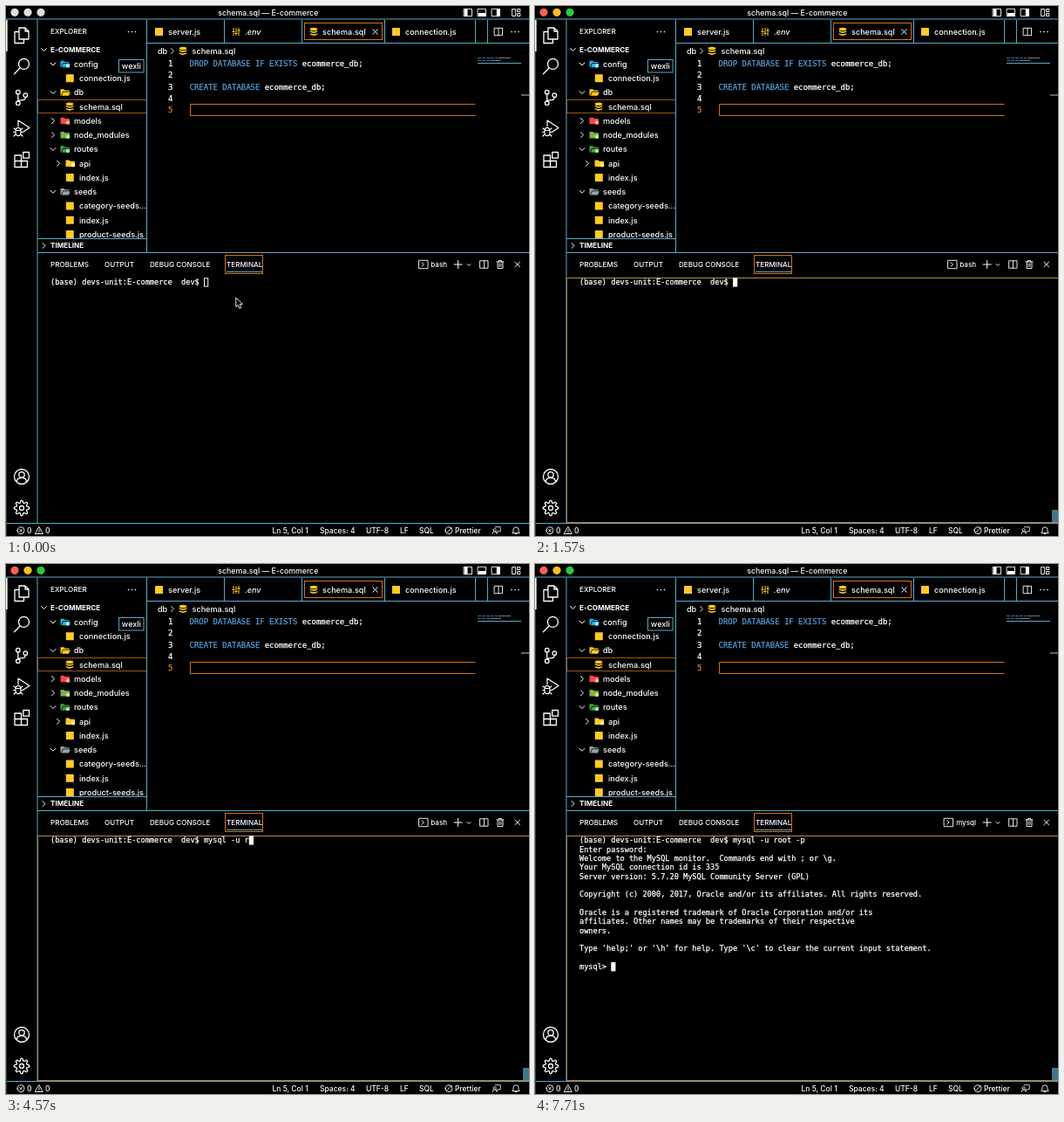
Write an HTML page that moves like this. It is 600x607 px and loops after 8000 ms.

```html
<!DOCTYPE html>
<html lang="en">
<head>
<meta charset="utf-8">
<title>Editor with terminal</title>
<style>
  html, body { margin: 0; width: 100%; height: 100%; overflow: hidden; background: #000; }
  svg { display: block; width: 600px; height: 607px; }
  text { font-family: Inter, "Open Sans", sans-serif; font-weight: 500; fill: #fff; white-space: pre; }
  .mono { font-family: "DejaVu Sans Mono", monospace; font-weight: 400; stroke: #fff; stroke-width: .25px; }
  .mono .keyword { fill: #569cd6; stroke: #569cd6; }
  .mono.current { fill: #e8801c; stroke: #e8801c; }
  .bold { font-weight: 700; }
  .icon { fill: none; stroke: #fff; stroke-linecap: round; stroke-linejoin: round; }
</style>
</head>
<body>
<svg id="stage" viewBox="0 0 600 607" xmlns="http://www.w3.org/2000/svg"></svg>
<script>
const LOOP = 8000;
const CYAN = '#58a9cb', ORANGE = '#d4701a', YELLOW = '#ffca28', BLUE = '#569cd6';
const TERM = { x: 51, y: 319.4, size: 8.6, step: 10.34, advance: 8.6 * 0.602 };
const stage = document.getElementById('stage');
const out = [];

const add = markup => out.push(markup);
const text = (x, y, str, size = 9.1, attrs = '') =>
  add(`<text x="${x}" y="${(y + size * 0.36).toFixed(2)}" font-size="${size}" ${attrs}>${str}</text>`);
const box = (x, y, w, h, stroke, fill = 'none', attrs = '') =>
  add(`<rect x="${x}" y="${y}" width="${w}" height="${h}" stroke="${stroke}" fill="${fill}" ${attrs}/>`);
const fill = (x, y, w, h, color, attrs = '') => box(x, y, w, h, 'none', color, attrs);
const rule = (d, color = CYAN) => add(`<path d="${d}" fill="none" stroke="${color}"/>`);
const icon = (x, y, d, width = 1, attrs = '') =>
  add(`<path class="icon" transform="translate(${x} ${y})" d="${d}" stroke-width="${width}" ${attrs}/>`);
const circle = r => `M${-r} 0a${r} ${r} 0 1 0 ${2 * r} 0a${r} ${r} 0 1 0 ${-2 * r} 0z`;

const CROSS = 'M-2.8 -2.8L2.8 2.8M2.8 -2.8L-2.8 2.8';
const DOWN = 'M-3 -1.5L0 1.5L3 -1.5', RIGHT = 'M-1.5 -3L1.5 0L-1.5 3';
const SPLIT = 'M-4.5 -4.2h9v8.4h-9zM0 -4.2v8.4';

const fileBlock = (x, y) => fill(x, y - 4.5, 9, 9, YELLOW, 'rx="0.6"');
const dots = (x, y) => [-4, 0, 4].forEach(dx => fill(x + dx - 0.7, y - 0.7, 1.4, 1.4, '#fff'));

function database(x, y) {
  add(`<g transform="translate(${x} ${y})" fill="${YELLOW}"><ellipse cy="-3" rx="4.3" ry="1.8"/>` +
    [-1.6, 1.4].map(v => `<path d="M-4.3 ${v}q4.3 2.6 8.6 0v1.7q-4.3 2.8 -8.6 0z"/>`).join('') + '</g>');
}

function folder(x, y, color, open, mark) {
  const front = open ? 'M-5.5 3.8v-7.6h3.8l1.2 1.3h5v1.2h-7.2l-2.2 5.1zM-2.4 -0.5h8.2l-1.8 4.3h-8z'
                     : 'M-5.5 3.8v-7.6h4l1.3 1.3h5.2v6.3z';
  add(`<g transform="translate(${x} ${y})"><path d="${front}" fill="${color}"/>` +
    (mark ? `<circle cx="3" cy="2" r="2.3" fill="${mark}"/>` : '') + '</g>');
}

function titleBar() {
  [['#ff5f57', 10], ['#febc2e', 25], ['#28c840', 40]].forEach(([color, x]) =>
    add(`<circle class="light" data-color="${color}" cx="${x}" cy="7.3" r="4.6"/>`));
  text(300.8, 8, 'schema.sql — E-commerce', 8.75, 'text-anchor="middle"');
  [[530, -4, -4, 3.5, 8], [546, -4, 0.5, 8.5, 3.5], [562, 0.8, -4, 3.5, 8]].forEach(([x, dx, dy, w, h]) => {
    icon(x, 7.5, 'M-4.5 -4.2h9v8.4h-9z', 0.9);
    fill(x + dx, 7.5 + dy, w, h, '#fff');
  });
  icon(585.5, 7.5, 'M-4.5 -4h3.6v8h-3.6zM1.4 -4h3v3h-3zM1.4 1h3v3h-3z', 0.9);
}

function activityBar() {
  icon(18, 34, 'M-3 -9h7l4 4v9h-11zM4 -9v4h4M-3 -4.5h-5v13h10.5v-4.5', 1.3);
  icon(18, 69, 'M-2 2L-8.5 8.8M-3.5 -2.6a6 6 0 1 0 12 0a6 6 0 1 0 -12 0', 1.3);
  icon(18, 105, 'M-6.5 -6.3a2.3 2.3 0 1 0 4.6 0a2.3 2.3 0 1 0 -4.6 0M-6.5 6.3a2.3 2.3 0 1 0 4.6 0a2.3 2.3 0 1 0 -4.6 0' +
    'M2 -2.8a2.3 2.3 0 1 0 4.6 0a2.3 2.3 0 1 0 -4.6 0M-4.2 -4V4M4.3 -0.5q0 3.3 -4 3.3h-2q-2.5 0 -2.5 1.2', 1.3);
  icon(18, 140, 'M-4 -2.5v-6.5l13 8.5l-7 4.6M-7 3a3 3.6 0 0 1 6 0v2a3 3.6 0 0 1 -6 0zM-7 2.5h6' +
    'M-9 0l2 1.6M1 0l-2 1.6M-9.4 4.5h2.4M-1 4.5h2.4M-9 9l2 -2M1 9l-2 -2', 1.2);
  icon(18, 176, 'M-8 -5h7.5v13.5h-7.5zM-8 1.5h14.5v7h-7M1.8 -8.5h6.7v6.7h-6.7z', 1.3);
  icon(18, 539, circle(8.5) + 'M-3.2 -2.2a3.2 3.2 0 1 0 6.4 0a3.2 3.2 0 1 0 -6.4 0M-5.6 6.2q0 -4.8 5.6 -4.8t5.6 4.8', 1.3);
  let gear = '';
  for (let i = 0; i < 32; i++) {
    const angle = (i - 0.5) * Math.PI / 16, r = i % 4 < 2 ? 8.7 : 6.2;
    gear += `${i ? 'L' : 'M'}${(r * Math.cos(angle)).toFixed(2)} ${(r * Math.sin(angle)).toFixed(2)}`;
  }
  icon(18, 575, gear + 'z' + circle(2.5), 1.3);
}

function sidebar() {
  text(51, 29.5, 'EXPLORER', 8.1);
  dots(144.5, 29.5);
  icon(43.5, 50, DOWN);
  text(51, 50, 'E-COMMERCE', 8.1, 'class="bold"');
  // label, folder colour, open, badge, nested; files carry only a label
  const rows = [
    ['config', '#26b5dd', true, '#9fe3f5'], ['connection.js'],
    ['db', YELLOW, true], ['schema.sql'],
    ['models', '#ef4a43', false, '#ffb3a8'], ['node_modules', '#7cb342', false, '#c5e1a5'],
    ['routes', '#43a047', true, '#a5e0a8'], ['api', YELLOW, false, '#fff0a8', true], ['index.js'],
    ['seeds', '#90a4ae', true], ['category-seeds...'], ['index.js'], ['product-seeds.js']
  ];
  rows.forEach(([label, color, open, mark, nested], i) => {
    const y = 66.5 + i * 16.25, shift = nested ? 6 : 0;
    if (color) {
      icon(54 + shift, y, open ? DOWN : RIGHT);
      folder(68 + shift, y, color, open, mark);
    } else if (label.endsWith('.sql')) database(73, y);
    else fileBlock(68.8, y);
    text(color && !nested ? 78 : 84, y, label);
  });
  box(36.5, 107.5, 125, 15, '#9c5413');
  box(129.5, 61.5, 28.5, 14.5, CYAN, '#000');
  text(143.8, 69, 'wexli', 9, 'text-anchor="middle"');
  fill(37, 266, 124, 16, '#000');
  rule('M36 266.5H162');
  icon(43.5, 274.5, RIGHT);
  text(51, 274.5, 'TIMELINE', 8.1, 'class="bold"');
}

function editor() {
  fileBlock(171, 29.5);
  text(186, 29.5, 'server.js');
  icon(264, 29.5, 'M-3 -4v3M-3 1.5v2.5M0 -4v5M0 3.3v.7M3 -4v1.5M3 0v4M-4.2 0h2.4M-1.2 2h2.4M1.8 -1.4h2.4', 1.1,
    `style="stroke:${YELLOW}"`);
  text(274, 29.5, '.env', 9.1, 'font-style="italic"');
  database(353, 29.5);
  text(363, 29.5, 'schema.sql');
  icon(423.5, 29.5, CROSS);
  fileBlock(443, 29.5);
  text(458, 29.5, 'connection.js');
  icon(565, 29.5, SPLIT, 0.9);
  dots(584, 29.5);
  rule('M250.5 16V42M339.5 16V42M434.5 16V42M538.5 16V42M552.5 16V42M162 42.5H600');
  box(342.5, 19.5, 89, 19, ORANGE);

  text(174, 51.5, 'db');
  icon(191, 51.5, RIGHT, 0.8);
  database(203, 51.5);
  text(213.5, 51.5, 'schema.sql');

  const code = [['DROP DATABASE IF EXISTS', ' ecommerce_db;'], [], ['CREATE DATABASE', ' ecommerce_db;'], [], []];
  code.forEach(([words, rest], i) => {
    const y = 65.7 + i * 13.35;
    text(191.5, y, i + 1, 8.95, `class="mono${i === 4 ? ' current' : ''}" text-anchor="end"`);
    if (words) text(210.6, y, `<tspan class="keyword">${words}</tspan>${rest}`, 8.95, 'class="mono"');
  });
  rule('M538.5 112.5H211.5V125.5H538.5', ORANGE);

  add(`<path d="M541 59.5h23M541 62.5h14" stroke="${BLUE}" stroke-dasharray="4 1" opacity=".7"/>` +
    '<path d="M565 59.5h14M556 62.5h12" stroke="#ccc" opacity=".6"/>');
  rule('M541 65.5H591');
  rule('M591 102H600', '#c4c4c4');
}

function panel() {
  [[51, 'PROBLEMS'], [113, 'OUTPUT'], [165, 'DEBUG CONSOLE'], [253, 'TERMINAL']]
    .forEach(([x, label]) => text(x, 296, label, 8.1));
  box(251.5, 285.5, 43, 21, ORANGE);
  rule('M253 304.5H294');
  add('<g id="shellIcon">');
  icon(479, 296, 'M-5 -4.7h10v9.4h-10zM-2 -2.2L0.6 0L-2 2.2', 0.9);
  add('</g>');
  text(506, 296, 'bash', 8, 'id="shell" text-anchor="end"');
  icon(518.7, 296, 'M-4.6 0h9.2M0 -4.6v9.2');
  icon(531, 296.5, 'M-2 -1L0 1L2 -1', 0.9);
  icon(548.5, 296, SPLIT, 0.9);
  icon(567, 296, 'M-4 -3h8M-1.5 -3v-1.5h3v1.5M-3 -3v7.5h6v-7.5M-1 -1v3.5M1 -1v3.5', 0.9);
  icon(586.7, 296, CROSS);
}

function statusBar() {
  const y = 600.7;
  icon(17, y, circle(4) + 'M-1.5 -1.5L1.5 1.5M1.5 -1.5L-1.5 1.5', 0.9);
  icon(38, y, 'M0 -4L4.4 3.8H-4.4zM0 -1V1.3M0 2.5v.1', 0.9);
  [[24, '0'], [45, '0'], [305.5, 'Ln 5, Col 1'], [360, 'Spaces: 4'], [413, 'UTF-8'], [452, 'LF'],
    [474, 'SQL'], [515, 'Prettier']].forEach(([x, label]) => text(x, y, label, 8.5));
  icon(508, y, circle(4) + 'M-2.8 2.8L2.8 -2.8', 0.9);
  icon(563, y, 'M-1.8 -4h6v5h-2.2l-1.8 1.6v-1.6M-4 -0.5a1.6 1.6 0 1 0 3.2 0a1.6 1.6 0 1 0 -3.2 0M-5 4q0 -2.8 2.6 -2.8t2.6 2.8', 0.8);
  icon(585, y, 'M-4 2.6l1 -1.5v-2a3 3 0 0 1 6 0v2l1 1.5zM-1 4h2', 0.9);
}

function frameLines() {
  rule('M0 15H600M36 15.5V592M161.5 15.5V282M36 282.5H600M0 592.5H600');
  rule('M0.5 16V607', '#22424d');
  fill(0, 16, 1.7, 36, '#f0f0f0');
}

function terminal() {
  add('<g id="focus"><path d="M36.5 592V311.5H600" fill="none" stroke="#b08a4e"/>' +
    `<path d="M37 591.5H600" stroke="${ORANGE}"/><rect x="593" y="577" width="7" height="14" fill="#43758a"/></g>`);
  for (let i = 0; i < 15; i++)
    add(`<text class="mono row" x="${TERM.x}" y="${TERM.y + i * TERM.step}" font-size="${TERM.size}"/>`);
  add('<rect id="caret"/>');
  add('<path id="arrow" d="M263.8 334v10.6l2.4 -2.2l1.7 4l1.9 -.8l-1.7 -3.9h3.3z" fill="#000" stroke="#fff" stroke-width=".9"/>');
  add('<g id="beam" fill="none"><path d="M-2.8 -6q2.3 0 2.8 1.2q.5 -1.2 2.8 -1.2M0 -5V5M-2.8 6q2.3 0 2.8 -1.2q.5 1.2 2.8 1.2M-1.5 1.5h3" stroke="#ddd" stroke-width="1.4"/></g>');
}

[titleBar, activityBar, sidebar, editor, panel, statusBar, frameLines, terminal].forEach(draw => draw());
stage.innerHTML = out.join('');

const PROMPT = '(base) devs-unit:E-commerce  dev$ ';
const COMMAND = 'mysql -u root -p';
const KEY_TIMES = [1710, 2000, 2290, 2570, 2710, 3000, 3290, 4000, 4290, 4570, 4710, 4860, 5000, 5140, 5290, 5710];
const AT = { focus: 430, beam: 290, beamEnd: 1570, password: 5860, shell: 6000, enter: 7290, output: 7430 };
const BEAM_PATH = [[290, 264, 336], [570, 264.5, 331.5], [1000, 264, 346], [1290, 253.5, 324.5]];
const GREETING = [
  'Welcome to the MySQL monitor.  Commands end with ; or \\g.',
  'Your MySQL connection id is 335',
  'Server version: 5.7.20 MySQL Community Server (GPL)',
  '',
  'Copyright (c) 2000, 2017, Oracle and/or its affiliates. All rights reserved.',
  '',
  'Oracle is a registered trademark of Oracle Corporation and/or its',
  'affiliates. Other names may be trademarks of their respective',
  'owners.',
  '',
  "Type 'help;' or '\\h' for help. Type '\\c' to clear the current input statement.",
  '',
  'mysql> '
];

const get = id => document.getElementById(id);
const rows = [...document.querySelectorAll('.row')];
const lights = [...document.querySelectorAll('.light')];
const show = (id, on) => get(id).setAttribute('visibility', on ? 'visible' : 'hidden');
const setAll = (node, attrs) => Object.entries(attrs).forEach(([name, value]) => node.setAttribute(name, value));

function linesAt(t) {
  const lines = [PROMPT + COMMAND.slice(0, KEY_TIMES.filter(key => key <= t).length)];
  if (t >= AT.password) lines.push('Enter password: ');
  if (t >= AT.output) lines.push(...GREETING);
  else if (t >= AT.enter) lines.push('');
  return lines;
}

function render(t) {
  const lines = linesAt(t), last = lines.length - 1, focused = t >= AT.focus;
  rows.forEach((row, i) => {
    const line = lines[i] || '';
    if (row.textContent !== line) row.textContent = line;
  });
  const inset = focused ? 0 : 0.5;
  setAll(get('caret'), {
    x: TERM.x + lines[last].length * TERM.advance + inset,
    y: 311.3 + last * TERM.step + inset,
    width: 5.2 - inset * 2, height: 10.3 - inset * 2,
    fill: focused ? '#fff' : 'none', stroke: focused ? 'none' : '#fff'
  });
  lights.forEach(light => light.setAttribute('fill', focused ? light.dataset.color : '#dedede'));
  show('focus', focused);
  show('arrow', t < AT.beam);
  show('beam', t >= AT.beam && t < AT.beamEnd);
  const spot = BEAM_PATH.filter(([time]) => time <= t).pop();
  if (spot) get('beam').setAttribute('transform', `translate(${spot[1]} ${spot[2]})`);
  const inClient = t >= AT.shell;
  get('shell').textContent = inClient ? 'mysql' : 'bash';
  get('shellIcon').setAttribute('transform', `translate(${inClient ? -4.5 : 0} 0)`);
}

const start = performance.now();
function tick() {
  render((performance.now() - start) % LOOP);
  requestAnimationFrame(tick);
}
tick();
</script>
</body>
</html>
```
